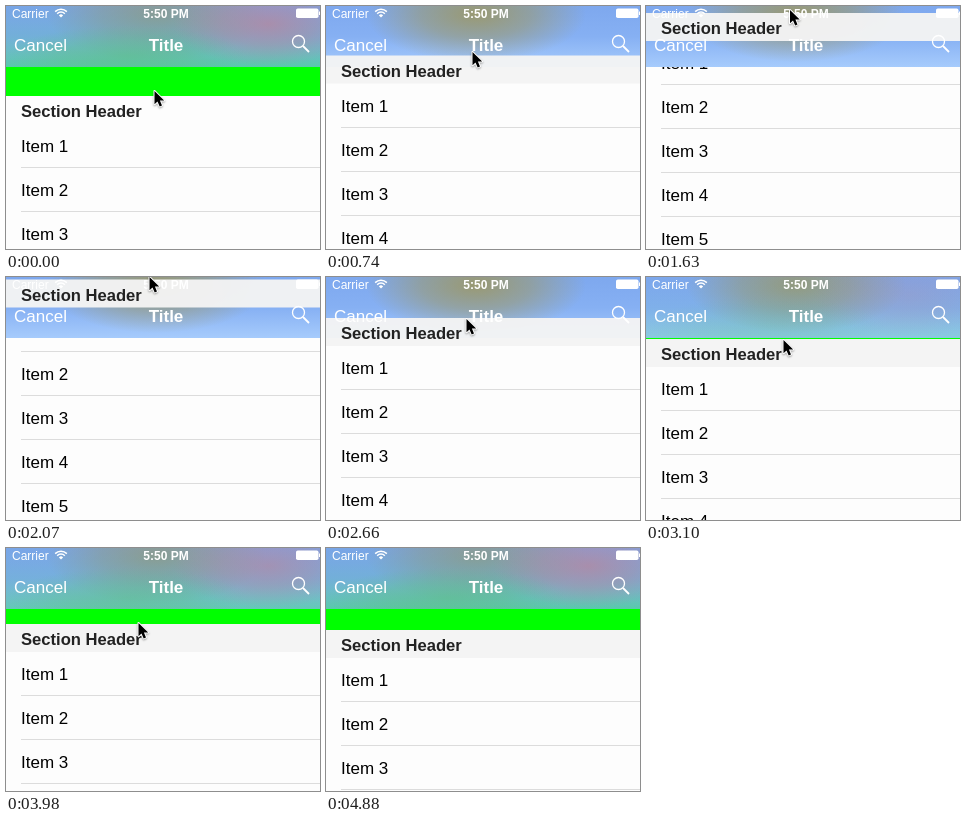
An HTML page with a canvas for the animation above (5780 ms loop, 314 by 243 pixels).

```html
<!DOCTYPE html>
<html lang="en">
<head>
<meta charset="utf-8">
<title>Scrolling list</title>
<style>
  html, body { margin: 0; width: 100%; height: 100%; overflow: hidden; background: #fdfdfd; }
  canvas { display: block; width: 314px; height: 243px; }
</style>
</head>
<body>
<canvas id="stage"></canvas>
<script>
const W = 314, H = 243, LOOP = 5780;
const NAV = 61, HEAD = 28, ROW = 44, REST = 82;
const FONT = '"Liberation Sans", Arial, sans-serif';
const PAPER = '#fdfdfd';

// Moments at which the picture is refreshed
const ticks = [0, 140, 290, 440, 590, 740, 890, 1030, 1180, 1330, 1480, 1620,
  1770, 1920, 2070, 2220, 2360, 2510, 2660, 2810, 2960, 3100, 3250, 3390, 3540,
  3690, 3840, 3980, 4130, 4430, 4580, 4730, 4880];

// time, top of section header, pointer x, pointer y
const path = [
  [0, 90, 148, 84],
  [740, 49.5, 146, 45],
  [1180, 25.5, 144, 19],
  [1620, 7, 143.5, 3],
  [2070, 2.5, 143, -1],
  [2360, 18, 142, 15],
  [2660, 41, 140, 41],
  [3100, 62, 137, 62],
  [3390, 47, 135, 38],
  [3540, 33.5, 134, 24],
  [3690, 30, 133, 25],
  [3980, 76, 132, 74],
  [4130, REST, 132, 80],
  [4280, REST, 132, 80],
  [4580, REST, 182, 155],
  [4730, REST, 233, 220],
  [4880, REST, 300, 300]
];

const canvas = document.getElementById('stage');
const ctx = canvas.getContext('2d');
const dpr = window.devicePixelRatio || 1;
canvas.width = Math.round(W * dpr);
canvas.height = Math.round(H * dpr);
ctx.scale(dpr, dpr);

const clamp = v => Math.max(0, Math.min(1, v));

function pose(t) {
  const i = path.findIndex(p => p[0] > t);
  if (i < 0) return path[path.length - 1].slice(1);
  const a = path[i - 1], b = path[i];
  const u = (t - a[0]) / (b[0] - a[0]);
  return a.slice(1).map((v, n) => v + (b[n + 1] - v) * u);
}

function rect(x, y, w, h, fill) {
  ctx.fillStyle = fill;
  ctx.fillRect(x, y, w, h);
}

function text(str, x, y, size, color, weight = 'normal', align = 'left') {
  ctx.font = `${weight} ${size}px ${FONT}`;
  ctx.fillStyle = color;
  ctx.textAlign = align;
  ctx.fillText(str, x, y);
}

// Soft elliptical patch of colour
function blob(x, y, rx, ry, rgb, alpha) {
  ctx.save();
  ctx.translate(x, y);
  ctx.scale(rx, ry);
  const g = ctx.createRadialGradient(0, 0, 0, 0, 0, 1);
  g.addColorStop(0, `rgba(${rgb},${alpha})`);
  g.addColorStop(0.5, `rgba(${rgb},${alpha * 0.6})`);
  g.addColorStop(1, `rgba(${rgb},0)`);
  ctx.fillStyle = g;
  ctx.fillRect(-1, -1, 2, 2);
  ctx.restore();
}

function vertical(y0, y1, ...colors) {
  const g = ctx.createLinearGradient(0, y0, 0, y1);
  colors.forEach((c, i) => g.addColorStop(i / (colors.length - 1), c));
  return g;
}

function navBackdrop(top) {
  const green = clamp((top - 52) / 28);
  ctx.save();
  ctx.beginPath();
  ctx.rect(0, 0, W, NAV);
  ctx.clip();
  rect(0, 0, W, NAV, vertical(0, NAV, '#7ea8ee', '#86b0f3', '#a6cbfc'));
  blob(150, 8, 110, 48, '158,150,92', 0.85);
  if (green > 0) {
    ctx.globalAlpha = green;
    rect(0, 0, W, NAV, vertical(0, NAV, 'rgba(110,160,215,.35)',
      'rgba(95,175,190,.5)', 'rgba(70,200,150,.8)'));
    blob(262, 18, 95, 42, '190,130,150', 0.7);
    blob(120, 50, 120, 30, '95,190,125', 0.5);
    ctx.globalAlpha = 1;
  }
  ctx.restore();
}

function list(top) {
  if (top > NAV) rect(0, NAV, W, top - NAV, '#00ff00');
  for (let i = 0; i < 6; i++) {
    const y = top + HEAD + i * ROW;
    text('Item ' + (i + 1), 15, y + 28, 17, '#000');
    rect(15, Math.round(y + ROW) - 1, W - 15, 1, '#dcdcdc');
  }
}

function sectionHeader(top) {
  rect(0, top, W, HEAD, top > REST + 3 ? PAPER : 'rgba(244,244,244,.96)');
  text('Section Header', 15, top + 21, 16.6, '#222', 'bold');
}

function wifi(x, y) {
  ctx.lineWidth = 1.5;
  for (const r of [8.3, 5.4]) {
    ctx.beginPath();
    ctx.arc(x, y, r, -Math.PI * 0.75, -Math.PI * 0.25);
    ctx.stroke();
  }
  ctx.beginPath();
  ctx.moveTo(x, y);
  ctx.arc(x, y, 3, -Math.PI * 0.75, -Math.PI * 0.25);
  ctx.fill();
}

function navItems() {
  text('Carrier', 6, 11.5, 12, '#fff');
  text('5:50 PM', 160, 11.5, 12, '#fff', 'bold', 'center');
  text('Cancel', 8, 45, 17, '#fff');
  text('Title', 160, 45, 17, '#fff', 'bold', 'center');
  ctx.strokeStyle = ctx.fillStyle = '#fff';
  wifi(55, 11.5);
  // Battery
  ctx.beginPath();
  ctx.roundRect(290, 2.5, 22.5, 9.5, 1.8);
  ctx.fill();
  rect(313, 5.5, 1.5, 3.5, '#fff');
  // Magnifier
  ctx.lineWidth = 1.3;
  ctx.beginPath();
  ctx.arc(292.5, 35.5, 6, 0, Math.PI * 2);
  ctx.stroke();
  ctx.lineWidth = 1.8;
  ctx.beginPath();
  ctx.moveTo(297, 40);
  ctx.lineTo(303, 46);
  ctx.stroke();
}

function pointer(x, y) {
  ctx.save();
  ctx.translate(x, y);
  ctx.shadowColor = 'rgba(0,0,0,.35)';
  ctx.shadowBlur = 2 * dpr;
  ctx.shadowOffsetY = dpr;
  const arrow = new Path2D('M.5 1V14.2L3.5 11.4L5.7 16.4L8 15.4L5.9 10.6H10.2Z');
  ctx.strokeStyle = '#fff';
  ctx.lineWidth = 2;
  ctx.lineJoin = 'round';
  ctx.stroke(arrow);
  ctx.shadowColor = 'transparent';
  ctx.fillStyle = '#000';
  ctx.fill(arrow);
  ctx.restore();
}

function draw(t) {
  const [top, x, y] = pose(t);
  rect(0, 0, W, H, PAPER);
  list(top);
  navBackdrop(top);
  sectionHeader(top);
  navItems();
  pointer(x, y);
}

let start = null;
function loop(now) {
  if (start === null) start = now;
  const t = (now - start) % LOOP;
  draw(ticks.filter(k => k <= t).pop());
  requestAnimationFrame(loop);
}
draw(0);
requestAnimationFrame(loop);
</script>
</body>
</html>
```
